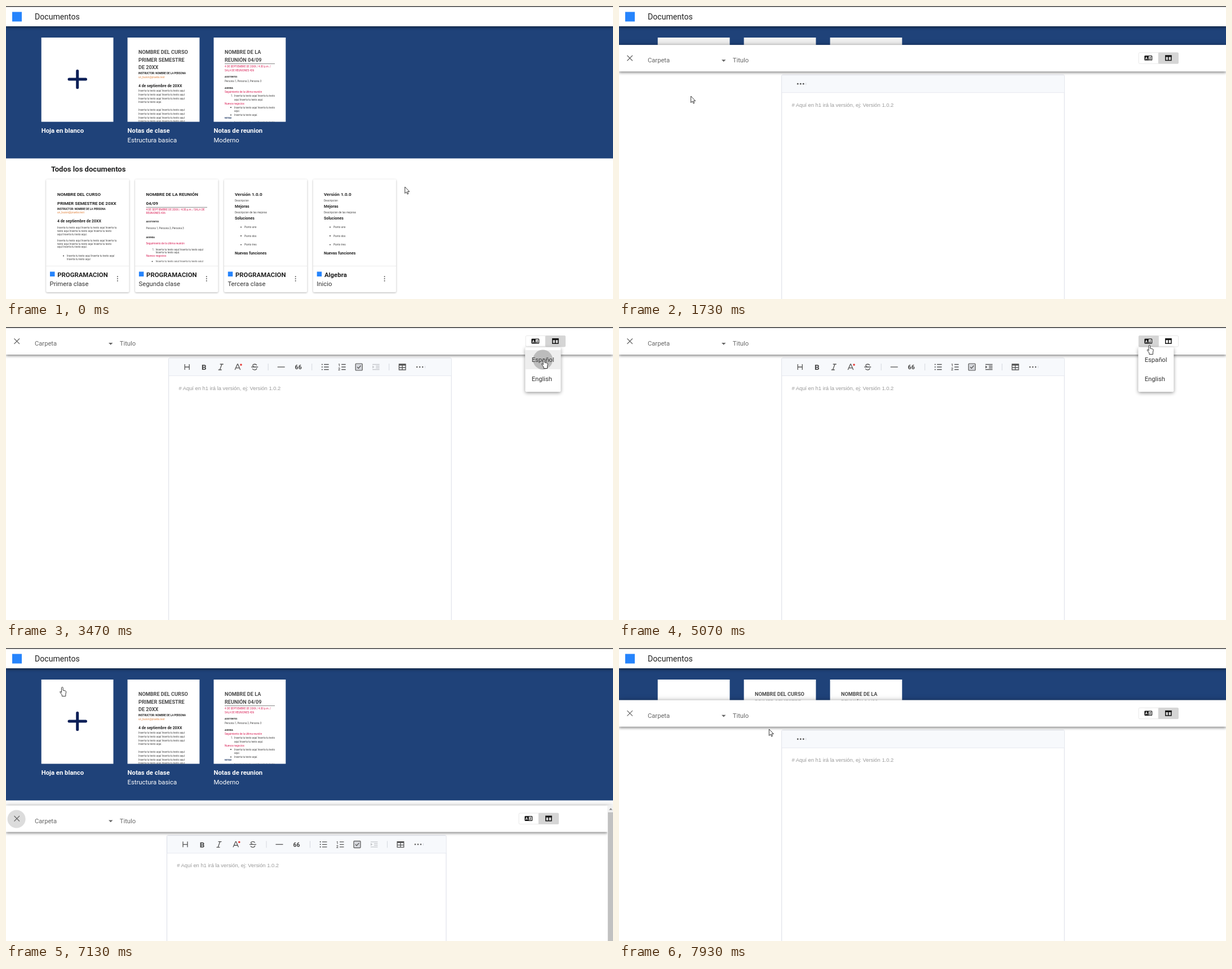
Recreate the animation shown at these times as an HTML page. Size 1077x520 px, loop 8 s.

```html
<!DOCTYPE html>
<html lang="es">
<head>
<meta charset="utf-8">
<title>Documentos</title>
<style>
html, body { margin: 0; width: 100%; height: 100%; overflow: hidden; background: #fff; }
svg { display: block; width: 1077px; height: 520px; font-family: Roboto, Arial, sans-serif; }
text { white-space: pre; }
.card { filter: drop-shadow(0 1px 1.5px rgba(0,0,0,.3)); }
.bar { filter: drop-shadow(0 2px 2.5px rgba(0,0,0,.5)); }
.sheet { filter: drop-shadow(0 0 5px rgba(0,0,0,.25)); }
.menu { filter: drop-shadow(0 2px 3px rgba(0,0,0,.4)); }
</style>
</head>
<body>
<svg viewBox="0 0 1077 520">
  <defs>
    <clipPath id="tops"><rect y="56" width="1077" height="149.5"/></clipPath>
    <clipPath id="pages"><rect y="307" width="1077" height="147.5"/></clipPath>
  </defs>
  <g id="home"></g>
  <g id="head"></g>
  <g id="sheet"></g>
  <rect width="1077" height="1.6" fill="#484848"/>
  <path id="cursor" stroke-width=".9" stroke="#222" fill="#fff" stroke-linejoin="round"/>
</svg>
<script>
const LOOP = 8000, STEP = 1000 / 15;
const $ = id => document.getElementById(id);
const RED = '#d81b52', INK = '#222', BLUE = '#2684fc';

const text = (x, y, size, s, fill = INK, bold = 0, more = '') =>
  `<text x="${x}" y="${y}" font-size="${size}" fill="${fill}" font-weight="${bold ? 700 : 400}" ${more}>${s}</text>`;
const rect = (x, y, w, h, fill, more = '') =>
  `<rect x="${x}" y="${y}" width="${w}" height="${h}" fill="${fill}" ${more}/>`;
const line = (d, color = '#555', width = 1.3, more = '') =>
  `<path d="${d}" fill="none" stroke="${color}" stroke-width="${width}" ${more}/>`;
const dot = (x, y, r, fill) => `<circle cx="${x}" cy="${y}" r="${r}" fill="${fill}"/>`;

// Rows of a miniature page: [baseline, size, text, style, indent]
const styles = {
  n: ['#444', 0], b: [INK, 1], g: ['#4a4a4a', 1], r: [RED, 0], o: ['#e0823d', 0], d: ['#1f3864', 1]
};
const page = (x, rows) => rows.map(([y, size, s, style = 'n', indent = 0, mark = '']) => {
  const [fill, bold] = styles[style];
  const bullet = mark === '•' ? dot(x + indent - 6, y - 1.6, .9, INK)
    : mark ? text(x + indent - 6, y, size, mark, fill) : '';
  return bullet + text(x + indent, y, size, s, fill, bold);
}).join('');

const FILL = 'Inserta tu texto aquí', TWO = FILL + ' ' + FILL, CUT = FILL + ' Inserta tu texto';
const MAIL = 'un_buzon@prueba.test', DATE = '4 de septiembre de 20XX';
const TEACHER = 'INSTRUCTOR: NOMBRE DE LA PERSONA';
const PEOPLE = 'Persona 1, Persona 2, Persona 3', FOLLOW = 'Seguimiento de la última reunión';

const classTemplate = page(235, [
  [85, 9.15, 'NOMBRE DEL CURSO', 'g'], [98.6, 9.15, 'PRIMER SEMESTRE', 'g'], [112.2, 9.15, 'DE 20XX', 'g'],
  [121, 4.55, TEACHER, 'b'], [128, 4.55, MAIL, 'o'], [143.8, 6.85, DATE, 'b'],
  ...[0, 1, 2, 3, 5, 6, 7, 8].map(i => [152 + i * 6.8, 4.55, i === 3 ? FILL + '.' : TWO])
]);
const meetingTemplate = line('M388 102.5H477', '#555', .7) + page(388, [
  [85, 9.15, 'NOMBRE DE LA', 'g'], [98.6, 9.15, 'REUNIÓN 04/09', 'g'],
  [108.7, 4.55, '4 DE SEPTIEMBRE DE 20XX / 4:30 p.m. /', 'r'], [115.5, 4.55, 'SALA DE REUNIONES 436', 'r'],
  [127.4, 3.8, 'ASISTENTES', 'b'], [134.7, 4.55, PEOPLE], [146.8, 3.8, 'AGENDA', 'b'],
  [154.2, 4.55, FOLLOW, 'r'], [161, 4.55, CUT, 'n', 17, '1.'], [167.8, 4.55, `aquí ${FILL}.`, 'n', 17],
  [174.8, 4.55, 'Nuevos negocios', 'r'], [181.6, 4.55, CUT, 'n', 17, '•'], [188.3, 4.55, 'aquí.', 'n', 17],
  [195, 4.55, FILL + '.', 'n', 17, '•'], [200, 3.8, 'NOTAS', 'd'], [208, 4.55, CUT, 'n', 17, '•']
]);
const para = y => [`${TWO} Inserta tu`, `texto aquí ${CUT.replace('texto aquí ', 'texto aquí ')}`, `aquí ${FILL}.`]
  .map((s, i) => [y + i * 5.7, 4.7, s]);
const classDoc = page(91, [
  [336.6, 8, 'NOMBRE DEL CURSO', 'b'], [352.6, 8, 'PRIMER SEMESTRE DE 20XX', 'b'],
  [362, 4.65, TEACHER, 'b'], [367.8, 4.7, MAIL, 'o'], [384.1, 6.9, DATE, 'b'],
  ...para(395.3), ...para(417.8), [445, 4.7, TWO, 'n', 17, '•'], [451, 4.7, FILL, 'n', 17]
]);
const meetingDoc = line('M248.5 357.3H357', '#555', .7) + page(248.5, [
  [336.6, 8, 'NOMBRE DE LA REUNIÓN', 'b'], [352.6, 8, '04/09', 'b'],
  [363.4, 4.7, '4 DE SEPTIEMBRE DE 20XX / 4:30 p.m. / SALA DE', 'r'], [369, 4.7, 'REUNIONES 436', 'r'],
  [384.3, 3.9, 'ASISTENTES', 'b'], [396, 4.7, PEOPLE], [411.6, 3.9, 'AGENDA', 'b'],
  [423.2, 4.7, FOLLOW, 'r'], [433.5, 4.7, TWO, 'n', 17, '1.'], [439.2, 4.7, FILL + '.', 'n', 17],
  [444.8, 4.7, 'Nuevos negocios', 'r'], [455, 4.7, TWO, 'n', 17, '•']
]);
const versionDoc = x => page(x, [
  [336.6, 8.1, 'Versión 1.0.0', 'b'], [347.2, 4.75, 'Descripcion'], [357.8, 7, 'Mejoras', 'b'],
  [368, 4.75, 'Descripcion de las mejoras'], [378.7, 7, 'Soluciones', 'b'],
  ...['uno', 'dos', 'tres'].map((s, i) => [394 + i * 15.6, 4.75, 'Punto ' + s, 'n', 17, '•']),
  [441.2, 7, 'Nuevas funciones', 'b']
]);

const templates = [['Hoja en blanco', ''], ['Notas de clase', 'Estructura basica'], ['Notas de reunion', 'Moderno']];
const docs = [['PROGRAMACION', 'Primera clase'], ['PROGRAMACION', 'Segunda clase'],
  ['PROGRAMACION', 'Tercera clase'], ['Algebra', 'Inicio']];

$('home').innerHTML =
  rect(-10, 36, 1100, 234.5, '#1f4279') +
  templates.map(([a, b], i) => {
    const x = 62.7 + i * 152.9;
    return rect(x, 56, 127.8, 149.5, '#fff', 'class="thumb"') +
      text(x, 224.5, 11.3, a, '#fff', 1) + text(x, 241.6, 11.3, b, '#fff');
  }).join('') +
  line('M112 130H141.5M126.7 115.2V144.8', '#0b1f57', 5, 'stroke-linecap="round"') +
  `<g clip-path="url(#tops)">${classTemplate}${meetingTemplate}</g>` +
  text(80, 293.5, 13.05, 'Todos los documentos', INK, 1) +
  docs.map(([a, b], i) => {
    const x = 71.2 + i * 157.9;
    return rect(x, 307.5, 147.3, 200.5, '#fff', 'rx="2" class="card"') +
      line(`M${x} 461.5h147.3`, '#e6e6e6', .8) +
      rect(x + 6.8, 471.5, 8.5, 8.5, BLUE) +
      text(x + 20, 480.5, 11.4, a, INK, 1) + text(x + 6.4, 497.3, 11.3, b, '#333') +
      [480.3, 484, 487.7].map(y => dot(x + 126.7, y, 1, '#555')).join('');
  }).join('') +
  `<g clip-path="url(#pages)">${classDoc}${meetingDoc}${versionDoc(406)}${versionDoc(564)}</g>`;

$('head').innerHTML = rect(0, 0, 1077, 36, '#fff', 'class="bar"') +
  rect(11, 10.5, 17, 17, BLUE) + text(51, 23.5, 14.1, 'Documentos', INK);

const dots = (x, r = 1.2) => [-5, 0, 5].map(d => dot(x + d, 71, r, '#555')).join('');

function toolbar(x, faint) {
  const c = '#555', at = (dx, s) => `<g transform="translate(${x + dx} 71)">${s}</g>`;
  const rows = 'M-2 -4.5H6.5M-2 0H6.5M-2 4.5H6.5', pale = faint ? '#c4c6ca' : c;
  return at(32.5, line('M-4 -5V5M4 -5V5M-4 0H4')) +
    at(62.5, text(-4.3, 5, 13.5, 'B', '#444', 1)) +
    at(92.5, line('M-1.5 -5H4.5M-4.5 5H1.5M1.8 -5L-1.8 5')) +
    at(122.5, line('M-5 5L-.6 -5H.2L4.5 5M-3.4 1.7H3') + dot(5.8, -4, 1.8, '#e53935')) +
    at(152.5, line('M3.7 -3Q2.5 -5.2 -.3 -5Q-4 -4.6 -3.2 -2Q-2.5 -.5 0 0M-4 3Q-2.5 5.3 .5 5Q4 4.5 3.5 2M-6 0H6')) +
    at(199.5, line('M-6.5 0H6.5')) +
    at(229.5, text(-5.6, 4, 10.5, '66', '#444', 1)) +
    at(277.5, line(rows) + [-4.5, 0, 4.5].map(y => dot(-5.3, y, 1.1, c)).join('')) +
    at(307.5, line(rows.replace(/-2/g, '-1')) + text(-7, -1, 6.5, '1', c, 1) + text(-7, 6, 6.5, '2', c, 1)) +
    at(337.5, rect(-6, -6, 12, 12, '#d5d7dc', 'rx="1" stroke="#555" stroke-width="1.2"') + line('M-3 0L-.8 2.3L3.3 -2.5')) +
    at(367.5, line('M-6 -4.5H6.5M0 -1.5H6.5M0 1.5H6.5M-6 4.5H6.5', pale) + `<path d="M-6 -2.5L-2.5 0L-6 2.5Z" fill="${pale}"/>`) +
    at(414.5, line('M-5.8 -5H5.8V5H-5.8ZM-5.8 1H5.8M0 -3V5') + rect(-6, -5.5, 12, 3, c)) +
    dots(x + 445.5) +
    line([176.5, 254, 391].map(d => `M${x + d} 65v12`).join('') + `M${x + 455} 69v4`, '#d5d8df', 1);
}

function editor(x, w, s) {
  return rect(x, 55, w, 500, '#fff', 'rx="2" stroke="#dadde6" stroke-width="1"') +
    rect(x + .5, 55.5, w - 1, 31, '#f7f9fc') + line(`M${x} 86.5h${w}`, '#e6e8ef', 1) +
    (s.loading ? dots(x + 33.5, 1.4) + line(`M${x + 43} 69v4`, '#d5d8df', 1) : toolbar(x, s.faint)) +
    text(x + 17.7, 111.5, 9.4, '# Aquí en h1 irá la versión, ej: Versión 1.0.2', '#999', 0,
      'font-family="Liberation Sans, Arial, sans-serif"') +
    (s.caret ? line(`M${x + 17.8} 102.5v10.5`, '#222', .8) : '');
}

function toggles(dx, lang) {
  return `<g transform="translate(${dx} 0)">` +
    rect(922, 15.5, 70.5, 19.5, '#fff', 'rx="2" stroke="#e2e2e2" stroke-width=".8"') +
    rect(lang ? 922 : 957, 15.3, 35.7, 20, '#d5d5d5', 'rx="1.5"') + line('M957 15.5v19.5', '#ddd', .7) +
    rect(932.3, 20.8, 13.8, 8.6, '#111', 'rx="1.2"') + rect(939.7, 22, 5.2, 6.2, '#fff') +
    text(933.6, 27.6, 6.5, 'A', '#fff', 1) + text(940.4, 27.5, 6, 'Z', '#111', 1) +
    line('M969.7 21H979.8V29.3H969.7ZM974.7 22V29', '#111', 1.5) + rect(969, 20.2, 11.5, 3, '#111') + '</g>';
}

function menu(alpha, pressed) {
  return `<g opacity="${alpha}">` + rect(921.3, 36, 63, 79, '#fff', 'rx="2" class="menu"') +
    (pressed ? rect(921.3, 41, 63, 34, '#eee') + dot(952.5, 58, 17.5, '#bcbcbc') : '') +
    text(932.7, 62, 11.2, 'Español', '#333') + text(932.7, 96, 11.2, 'English', '#333') + '</g>';
}

// cubic-bezier(.32, .72, 0, 1)
function ease(p) {
  if (p <= 0 || p >= 1) return p <= 0 ? 0 : 1;
  let lo = 0, hi = 1;
  for (let i = 0; i < 24; i++) {
    const u = (lo + hi) / 2;
    .96 * u * (1 - u) ** 2 + u ** 3 < p ? lo = u : hi = u;
  }
  return 2.16 * lo * (1 - lo) ** 2 + 3 * (1 - lo) * lo * lo + lo ** 3;
}

const OPEN = 1571, CLOSE = 7049, REOPEN = 7793, SLIDE = 500, DROP = 518;
const within = (t, a, b) => t >= a && t < b;
const slide = (t, start) => ease((t - start) / SLIDE);
const fade = (t, a, b) => Math.max(0, Math.min(1, (t - a) / 100, (b - t) / 130));

// Pointer path: time, x, y
const path = [
  [0, 707.8, 321], [130, 717, 319], [400, 560, 260], [870, 237, 168], [930, 232, 166], [1330, 98, 161],
  [1600, 98, 161], [1733, 127.3, 160], [2200, 518, 130], [2330, 524, 130], [2470, 530, 129], [2930, 938, 32],
  [3200, 941, 32], [3330, 950, 56], [3467, 954.5, 57], [3650, 954, 60], [4000, 945, 27], [4300, 943, 30],
  [4800, 941, 32], [5067, 941.3, 32], [5270, 948, 88], [5450, 950, 88], [5700, 974, 26], [5930, 974, 26],
  [6070, 895, 40], [6267, 399.5, 58], [6600, 60, 36], [6870, 17, 32], [7000, 17, 30], [7133, 99.8, 69],
  [7330, 122, 108], [7700, 126, 122], [7933, 266, 144], [8000, 320, 142]
];
function pointer(t) {
  const i = Math.max(1, path.findIndex(k => k[0] >= t));
  const [t0, x0, y0] = path[i - 1], [t1, x1, y1] = path[i];
  const p = Math.max(0, (t - t0) / (t1 - t0));
  return [x0 + (x1 - x0) * p, y0 + (y1 - y0) * p];
}

const ARROW = 'M0 0V11.5L2.7 9L4.4 13L6.2 12.2L4.5 8.4H8Z';
const HAND = 'M-1.4 10V1.2Q0 -.8 1.3 1.2V6L5.6 7Q7 7.5 6.8 9L6 13V16.5H-.5V14L-4 9.5Q-4.4 7.6 -2.8 8.3Z';

function draw(t) {
  const leaving = within(t, CLOSE, REOPEN);
  const modal = t >= OPEN && !leaving;
  const shown = t >= REOPEN ? slide(t, REOPEN) : leaving ? 1 - slide(t, CLOSE) : slide(t, OPEN);
  const off = DROP * (1 - shown);
  $('home').setAttribute('transform', `translate(${modal ? 6 : 0} 0)`);
  document.querySelectorAll('.thumb').forEach(r => r.setAttribute('fill', within(t, OPEN, CLOSE) ? '#f1f1f1' : '#fff'));

  const width = leaving ? 1067 : 1077, w = leaving ? 495.5 : 501.5;
  const s = {
    loading: within(t, OPEN, 1860) || within(t, 4330, 4430) || within(t, 5750, 5850) || t >= REOPEN,
    faint: t < 3600 || t >= 7000,
    caret: within(t, 2830, 3330)
  };
  const lists = within(t, 5750, 7000) ? [34.5, 543.3] : [leaving ? 285.5 : 288.7];
  const alpha = Math.max(fade(t, 3080, 3730), fade(t, 4900, 5550));
  const out = rect(0, 2, 1077, 560, '#fff', 'class="sheet"') +
    lists.map(x => editor(x, lists[1] ? 501 : w, s)).join('') +
    rect(0, 2, width, 47, '#fff', 'class="bar"') +
    (within(t, 6860, REOPEN) ? dot(18.6, 26, 16, '#dcdcdc') : '') +
    line('M14.5 20.5L24 30M24 20.5L14.5 30', '#666', 1.2) +
    text(51, 33, 11.2, 'Carpeta', '#666') + text(201.7, 33, 11.25, 'Titulo', '#666') +
    '<path d="M182 28H189.5L185.7 31.8Z" fill="#666"/>' +
    toggles(leaving ? -12 : 0, within(t, 3600, 5750)) +
    (alpha ? menu(alpha, within(t, 3330, 3700)) : '') +
    (leaving ? rect(1067, 2, 10, 560, '#f1f1f1') + rect(1068, 14, 9, 560, '#c1c1c1') +
      '<path d="M1070 10H1076L1073 6.5Z" fill="#888"/>' : '');
  $('sheet').innerHTML = shown > 0 ? `<g transform="translate(0 ${off})">${out}</g>` : '';

  const [x, y] = pointer(t), over = (a, b, c, d) => x >= a && x <= c && y >= b && y <= d;
  const onCard = y < off + 2 && [62, 216, 368].some(l => over(l, 56, l + 128, 205));
  const onSheet = shown === 1 && (over(922, 15, 993, 35) || over(2, 9, 35, 43) || alpha && over(921, 36, 984, 115));
  $('cursor').setAttribute('d', onCard || onSheet ? HAND : ARROW);
  $('cursor').setAttribute('transform', `translate(${x} ${y})`);
}

let last = -1;
function tick() {
  const step = Math.floor((performance.now() % LOOP + 5) / STEP) % 120;
  if (step !== last) draw((last = step) * STEP);
  requestAnimationFrame(tick);
}
tick();
</script>
</body>
</html>
```
